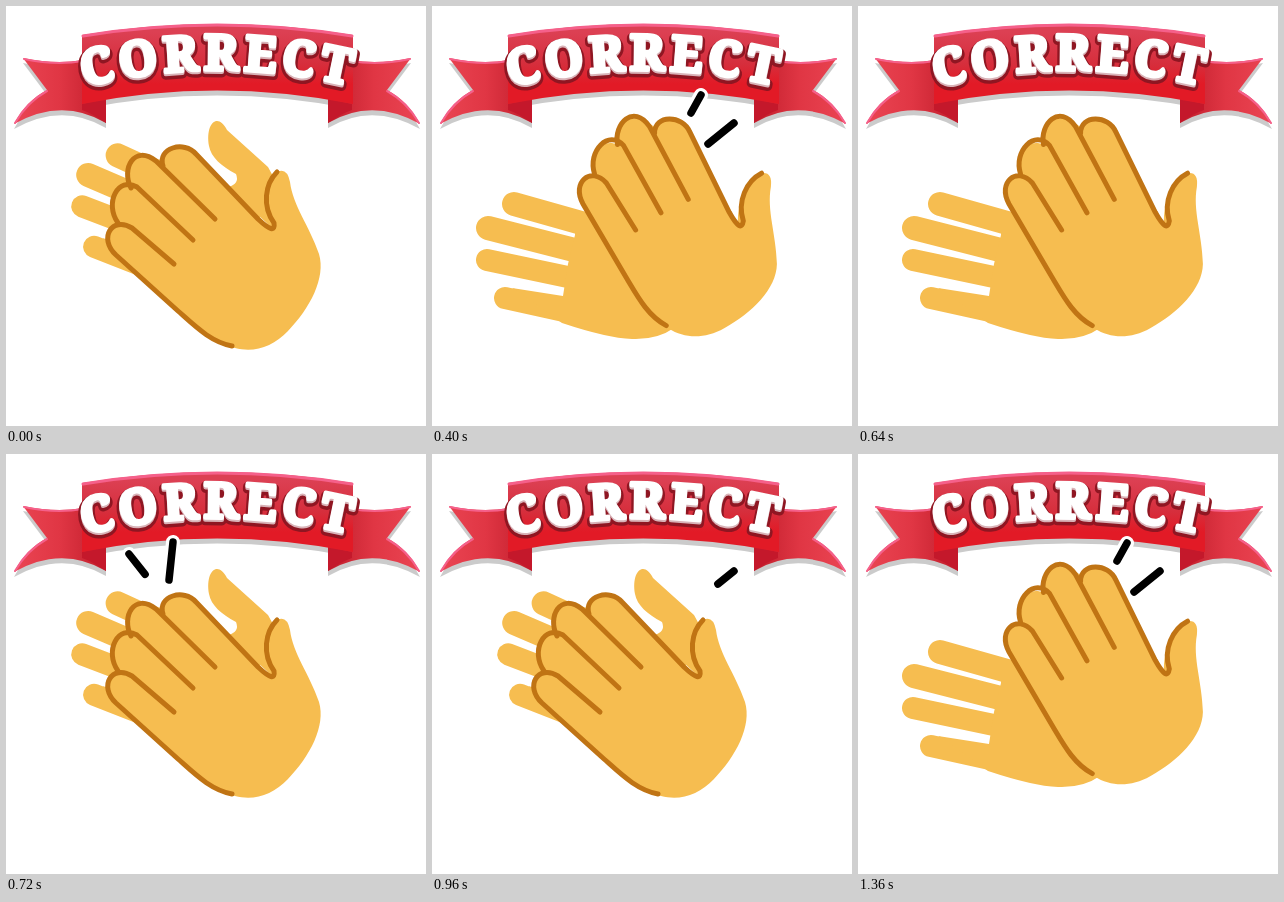
An HTML page that plays this animation: 420x420 px, repeating every 1.44 s.

```html
<!DOCTYPE html>
<html lang="en">
<head>
<meta charset="utf-8">
<title>Correct</title>
<style>
  html, body { margin: 0; width: 100%; height: 100%; overflow: hidden; background: #fff; }
  svg { display: block; width: 100vw; height: 100vh; }
  text { font: 900 49px "Noto Serif", "DejaVu Serif", serif; letter-spacing: 5px; text-anchor: middle; }
  .line { fill: none; stroke-linecap: round; stroke-linejoin: round; }
</style>
</head>
<body>
<svg viewBox="0 0 420 420">
  <defs>
    <linearGradient id="tailRed">
      <stop offset="0" stop-color="#ea4553"/>
      <stop offset=".5" stop-color="#e03644"/>
      <stop offset="1" stop-color="#c01d2b"/>
    </linearGradient>
    <linearGradient id="bandRed" x1="0" y1="0" x2="0" y2="1">
      <stop offset=".1" stop-color="#dc4053"/>
      <stop offset=".5" stop-color="#d62e3c"/>
      <stop offset=".75" stop-color="#e21a26"/>
    </linearGradient>
    <path id="tail" d="M17 52Q50 59 77 54L100 85V117Q56 91 8 118Q20 95 41 84Z"/>
    <path id="band" d="M76 29Q211 7 347 29V98Q211 71 76 98Z"/>
    <path id="arc" d="M56 86Q213 42 370 86"/>
    <text id="word"><textPath href="#arc" startOffset="50%">CORRECT</textPath></text>
  </defs>

  <g id="ribbon">
    <g fill="#cbcbcb" transform="translate(0 5)">
      <use href="#tail"/>
      <use href="#tail" transform="matrix(-1 0 0 1 422 0)"/>
      <use href="#band"/>
    </g>
    <g id="side">
      <use href="#tail" fill="url(#tailRed)"/>
      <path d="M76 98L100 93V117Q88 108 76 104Z" fill="#c4182b"/>
      <path class="line" stroke="#f5608a" stroke-width="2" d="M18 53Q50 60 77 55M9 117Q21 96 41 85"/>
    </g>
    <use href="#side" transform="matrix(-1 0 0 1 422 0)"/>
    <use href="#band" fill="url(#bandRed)"/>
    <path class="line" stroke="#f5608a" stroke-width="3" d="M77 30Q211 8 346 30"/>
    <g stroke-linejoin="round">
      <use href="#word" y="3" fill="#8f1622" stroke="#8f1622" stroke-width="9"/>
      <use href="#word" y="2" fill="#d9b3b8" stroke="#d9b3b8" stroke-width="4"/>
      <use href="#word" fill="#fff" stroke="#fff" stroke-width="4"/>
    </g>
  </g>

  <path class="line ticks" stroke="#fff" stroke-width="14"/>

  <g id="back" fill="#f6bd50">
    <g class="line" stroke="#f6bd50">
      <path stroke-width="24" d="M82 198L160 220M56 222L150 246"/>
      <path stroke-width="22" d="M55 254L150 274M73 292L150 309"/>
    </g>
    <path d="M143 204L152 206L230 215L242 322Q225 334 200 333Q175 332 130 317L80 282L131 290L136 258L143 229Z"/>
    <path transform="translate(80 196) rotate(-9) translate(-110 -147)"
      d="M203 140C199 117 212 106 221 124L262 161L268 172L266 222L222 181Q234 178 230 168C215 160 205 151 203 140Z"/>
  </g>

  <g id="front">
    <path fill="#f6bd50" d="M229 342C205 337 190 321 172 305L110 249C96 236 102 220 112 217C98 197 110 180 125 182C115 163 128 142 157 155C155 142 178 134 190 148L264 222C256 200 259 178 271 166Q281 161 284 176C287 200 303 219 313 248C320 272 304 302 282 325C267 341 248 347 229 342Z"/>
    <path class="line" stroke="#c07414" stroke-width="5" d="M226 340C205 336 190 321 172 305L110 249C92 232 106 210 126 222L168 258
      M112 217C98 197 112 170 131 181L187 234
      M125 182C115 163 128 138 150 155L209 213
      M157 160C151 142 178 134 190 148L252 213Q270 230 268 217C256 200 259 178 271 166"/>
  </g>

  <path class="line ticks" stroke="#000" stroke-width="7.5"/>
</svg>
<script>
const STEP = 80, STEPS = 18;
const el = id => document.getElementById(id);
const mix = (a, b, k) => a + (b - a) * k;

// Each stroke runs from its outer end; the number is the drawn share.
const strokes = {
  left: [123, 100, 146, 129],
  middle: [167, 88, 163, 126],
  upper: [269, 89, 259, 107],
  tall: [273, 75, 259, 107],
  right: [302, 117, 276, 138]
};
const marks = {
  3: { middle: 1 },
  4: { middle: .6, left: .7 },
  5: { upper: 1, right: 1 },
  6: { right: .62 },
  9: { middle: 1, left: .7 },
  10: { middle: .6, left: 1 },
  11: { tall: 1, right: 1 },
  12: { right: .62 },
  15: { middle: .6, left: 1 },
  17: { upper: 1, right: 1 }
};

function tick([x1, y1, x2, y2], share) {
  return `M${x1} ${y1}L${mix(x1, x2, share)} ${mix(y1, y2, share)}`;
}

function place(id, pivot, from, to, angles, k) {
  const x = mix(from[0], to[0], k), y = mix(from[1], to[1], k);
  el(id).setAttribute("transform",
    `translate(${x} ${y}) rotate(${mix(...angles, k)}) translate(${-pivot[0]} ${-pivot[1]})`);
}

function draw(now) {
  const step = Math.floor(now / STEP) % STEPS;
  const open = step % 3 / 2;
  place("front", [264, 222], [264, 222], [306, 218.5], [0, 17.5], open);
  place("back", [80, 196], [110, 147], [80, 196], [9, 0], open);
  const path = Object.entries(marks[step] || {}).map(([name, share]) => tick(strokes[name], share));
  for (const node of document.querySelectorAll(".ticks")) node.setAttribute("d", path.join(""));
}

const start = performance.now();
function loop() {
  draw(performance.now() - start);
  requestAnimationFrame(loop);
}
loop();
</script>
</body>
</html>
```
